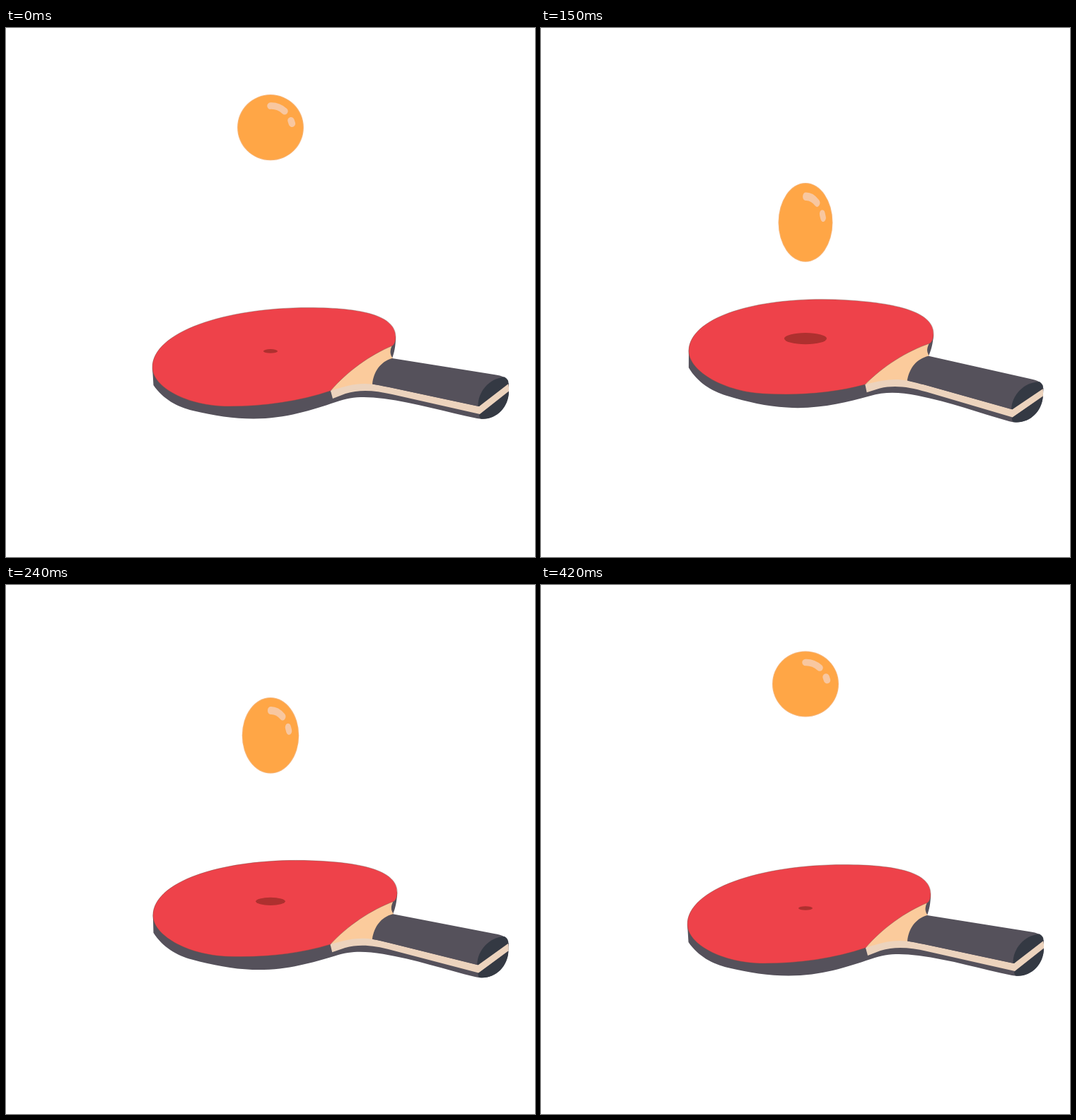
An HTML page with a canvas for the animation above (0.45 s loop, 748x748 px).

```html
<!DOCTYPE html>
<html lang="en">
<head>
<meta charset="utf-8">
<title>Bouncing ball</title>
<style>
html, body { margin: 0; width: 100%; height: 100%; overflow: hidden; background: #fff; }
canvas { display: block; }
</style>
</head>
<body>
<canvas id="stage" width="748" height="748"></canvas>
<script>
const ctx = document.getElementById('stage').getContext('2d');
const LOOP = 450, STEP = 30, HIT = 181.5, CONTACT = 1.5;
const PIVOT = { x: 599, y: 498 }, TILT = 0.117;

const rubber = new Path2D(`M459 513 C415 528 365 535 315 535 C256 535 207 507.5 207 480
  C207 430 310 395.5 428 395.5 C505 395.5 551 407 551 437
  C551 442 550 446 547 449 C515 462 482 486 459 513 Z`);

const body = [
  // rim and handle underside
  ['#55515b', `M207 480 L208.5 505 C222 525 243 536 264 541 C294 548 322 552.5 350 552.5
    C396 552.5 433 540 466 529 C490 520.5 508 521 534 524 C580 530 622 543 666 552
    C690 557 711 537 711 513 L711 502 L669 532 L519 500 L546 467
    C549 459 551 450 551 437 L459 513 Z`],
  // wooden neck
  ['#fbcb9c', 'M459 514 L480 480 L547 447 Q540 459 547 467 C532 473 522 486 518 506 Z'],
  // light edge strip
  ['#ecd3bd', `M459 513 C477 507 492 503 507 503 C520 503 530 506 542 508 L668 535
    L710 502.5 Q711.5 508 711 513.5 L670 546 L546 518 C520 512 500 511 480 517 L462 524 Z`],
  // grip
  ['#55515b', `M546 467 L690 490 Q699 491 705 494 L669 535 L542 508
    C534 506 526 504.5 518 503.5 C520 486 529 472 546 467 Z`],
  // end caps
  ['#343943', 'M667.5 534.5 C667 515 683 495 705 493.5 Q711 497 710.5 503 L669 535 Z'],
  ['#343943', 'M669 547 L711 514 C711 537 692 555 671 552.5 Q669 550 669 547 Z']
].map(([color, d]) => [color, new Path2D(d)]);

const glints = new Path2D('M374 109.5 Q385 109 394 117 M403 130 L404.5 134.5');

// 0 at the top of the bounce, 1 at contact
function fall(t) {
  const away = Math.abs(t - HIT);
  const d = Math.max(0, Math.min(away, LOOP - away) - CONTACT);
  const q = 1 - d / (LOOP / 2 - CONTACT);
  return 0.34 * q ** 3 + 0.66 * q ** 5;
}

function ellipse(x, y, rx, ry, color) {
  ctx.fillStyle = color;
  ctx.beginPath();
  ctx.ellipse(x, y, rx, ry, 0, 0, Math.PI * 2);
  ctx.fill();
}

function drawPaddle(p) {
  ctx.save();
  ctx.translate(PIVOT.x, PIVOT.y);
  ctx.rotate(TILT * p);
  ctx.translate(-PIVOT.x, -PIVOT.y);
  for (const [color, path] of body) {
    ctx.fillStyle = color;
    ctx.fill(path);
  }
  ctx.fillStyle = '#ee424a';
  ctx.fill(rubber);
  ctx.strokeStyle = 'rgba(110, 80, 70, 0.5)';
  ctx.lineWidth = 0.8;
  ctx.stroke(rubber);
  ctx.restore();
}

function drawBall(p) {
  const rx = 47 - 26 * p + 35 * p ** 3;
  const ry = 46.5 + 28 * p - 36.5 * p ** 3;
  const y = 140 + 249 * p;
  ellipse(374, y, rx, ry, '#f6b477');
  ellipse(374, y, rx - 1, ry - 1, '#ffa646');
  ctx.save();
  ctx.translate(374, y);
  ctx.scale(rx / 47, ry / 46.5);
  ctx.translate(-374, -140);
  ctx.strokeStyle = '#f8c7a0';
  ctx.lineWidth = 9.5;
  ctx.lineCap = 'round';
  ctx.stroke(glints);
  ctx.restore();
}

function draw(time) {
  const p = fall(Math.floor((time % LOOP) / STEP) * STEP);
  ctx.fillStyle = '#fff';
  ctx.fillRect(0, 0, 748, 748);
  drawPaddle(p);
  ellipse(374, 457 - 33 * p, 10 + 37 * p, 2.8 + 9.7 * p, '#ae302f');
  drawBall(p);
}

let start;
function loop(now) {
  start ??= now;
  draw(now - start);
  requestAnimationFrame(loop);
}
draw(0);
requestAnimationFrame(loop);
</script>
</body>
</html>
```
